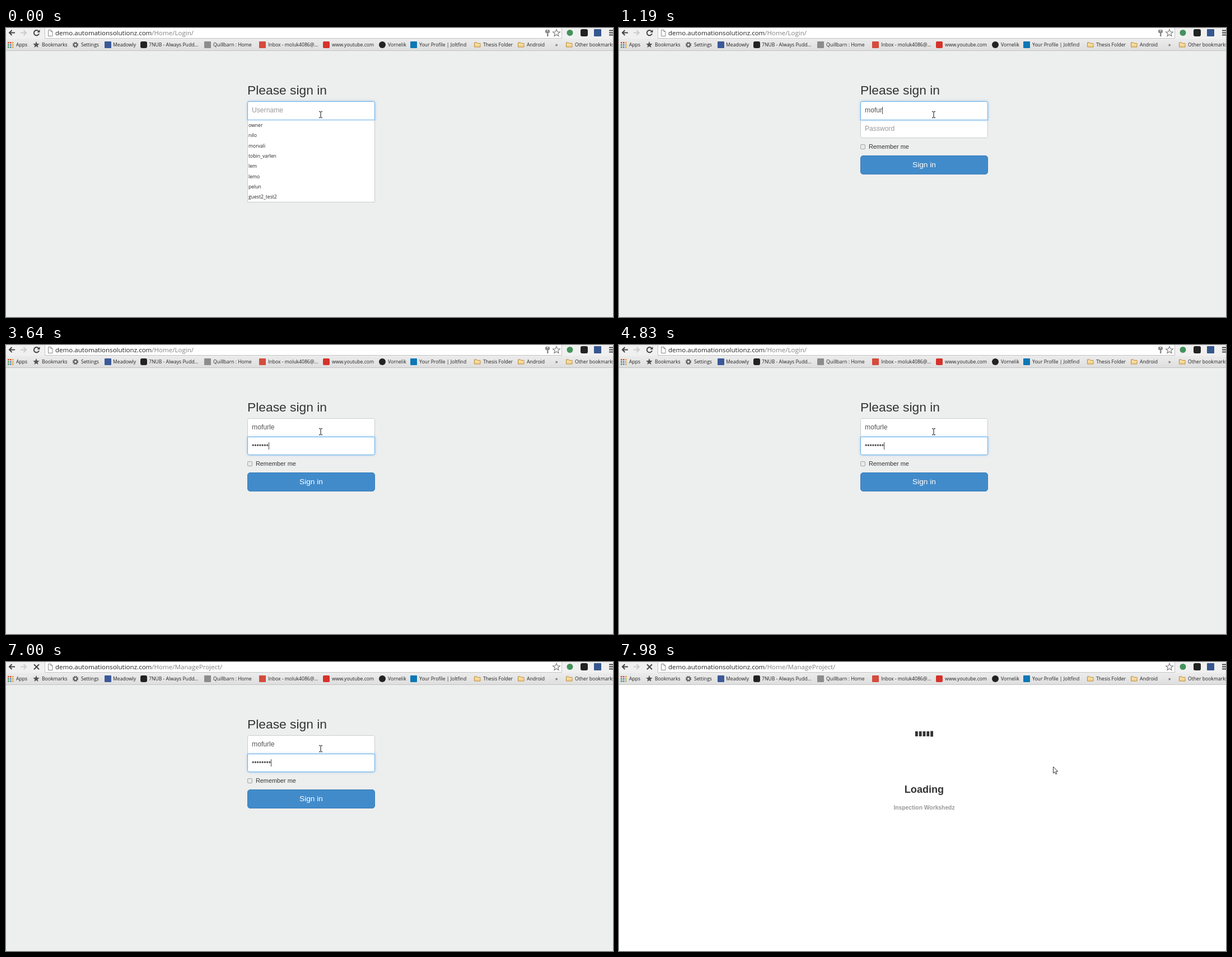
An HTML page for the animation above (8000 ms loop, 1084 px wide and 517 px high).

```html
<!DOCTYPE html>
<html lang="en">
<head>
<meta charset="utf-8">
<title>Sign in</title>
<style>
  html, body { margin: 0; width: 100%; height: 100%; overflow: hidden; background: #fff; }
  svg { display: block; }
  text { font-family: "Liberation Sans", Arial, sans-serif; font-size: 12.16px; fill: #555; white-space: pre; }
  .ui text { font-family: "Open Sans", "Noto Sans", sans-serif; font-size: 8.65px; fill: #222; }
  .ui .url { font-size: 11.55px; }
  .ui .path { fill: #808080; }
  .hint { fill: #999; }
  .mid { text-anchor: middle; }
  .line { fill: none; stroke: #444; stroke-width: 2; }
  .focus { fill: #fff; stroke: #66afe9; filter: drop-shadow(0 0 2px rgba(102,175,233,.6)); }
</style>
</head>
<body>
<svg width="1084" height="517" viewBox="0 0 1084 517">
  <defs>
    <linearGradient id="barFill" x2="0" y2="1"><stop stop-color="#ececec"/><stop offset="1" stop-color="#dedede"/></linearGradient>
    <path id="star" d="M0-6 1.6-2 5.8-1.8 2.5.9 3.6 5 0 2.7-3.6 5-2.5.9-5.8-1.8-1.6-2Z"/>
    <g id="folder" stroke="#b98a3c"><path d="M.5 9.5V1.5H4.5L6 3H11V9.5Z" fill="#f5d58e"/><path d="M1 4.5H11" stroke="#fbe9bd"/></g>
  </defs>

  <g id="login">
    <rect y="41" width="1084" height="476" fill="#edeeee"/>
    <text x="431" y="119" style="font-size:22.8px;fill:#333">Please sign in</text>
    <path d="M431.5 164V134.5q0-3 3-3H655.5q3 0 3 3V164" fill="#fff" stroke="#ccc"/>
    <path d="M431.5 164.5V193.5q0 3 3 3H655.5q3 0 3-3V164.5Z" fill="#fff" stroke="#ccc"/>
    <path id="focusUser" class="focus" d="M431.5 164.500V134.500q0-3 3-3H655.500q3 0 3 3V164.500Z"/>
    <path id="focusPass" class="focus" d="M431.5 164.500V193.500q0 3 3 3H655.500q3 0 3-3V164.500Z"/>
    <text id="user" x="439" y="151"></text>
    <text id="pass" x="439" y="184"></text>
    <rect id="caret" width="1" height="13" fill="#444"/>
    <rect x="431.5" y="208.5" width="8" height="8" rx="1.5" fill="#e9e9e9" stroke="#a4a4a4"/>
    <text x="446" y="216" style="font-size:10.85px;fill:#333">Remember me</text>
    <rect x="431.5" y="228.5" width="227" height="33" rx="4.5" fill="#428bca" stroke="#357ebd"/>
    <text x="545" y="249" class="mid" style="font-size:13.7px;fill:#fff">Sign in</text>
    <g id="menu" class="ui">
      <rect x="431" y="165" width="228" height="147" fill="#fff"/>
      <path d="M431.500 165V311.500H658.500V165" fill="none" stroke="#c6c9cb"/>
    </g>
  </g>

  <g id="loading">
    <g id="bars" fill="#333"></g>
    <text x="545" y="234" class="mid" style="font-size:18.1px;font-weight:bold;fill:#333">Loading</text>
    <text x="545" y="264" class="mid" style="font-size:10.3px;font-weight:bold;fill:#999">Inspection Workshedz</text>
  </g>

  <g id="chrome" class="ui">
    <rect width="1084" height="20" fill="#f0f0f0"/>
    <rect x="69" width="924" height="18" fill="#fff"/>
    <path d="M69.5 0V18.5H992.5V0" fill="none" stroke="#c4c4c4"/>
    <rect y="19" width="1084" height="22" fill="url(#barFill)"/>
    <path d="M0 40.5H1084" stroke="#c3c3c3"/>
    <path class="line" d="M16 8.5H6M10.5 4 6 8.5 10.5 13"/>
    <path class="line" d="M26 8.5H36M31.5 4 36 8.5 31.5 13" style="stroke:#ccc"/>
    <g id="reload"><path class="line" d="M58 5.5A4.7 4.7 0 1 0 59 10"/><path d="M60.5 3V8H55.5Z" fill="#444"/></g>
    <path id="stop" class="line" d="M50 4.3 59 13.3M59 4.3 50 13.3"/>
    <path d="M75.5 3.5H80L83 6.5V14.5H75.5ZM80 3.5V6.5H83" fill="#fff" stroke="#888"/>
    <text class="url" x="88" y="13">demo.automationsolutionz.com<tspan id="path" class="path"></tspan></text>
    <g id="key" fill="#8a8a8a"><rect x="963" y="3" width="8" height="6" rx="2"/><rect x="966" y="8" width="2.5" height="7"/><rect x="966" y="4" width="2" height="1.5" fill="#fff"/></g>
    <use href="#star" transform="translate(983 9) scale(1.1)" fill="#fff" stroke="#777"/>
    <circle cx="1007" cy="8.5" r="5.5" fill="#43925b"/>
    <rect x="1026" y="2" width="13" height="13" rx="3" fill="#222"/>
    <rect x="1050" y="2" width="13" height="13" rx="1" fill="#35568f"/>
    <path class="line" d="M1077 4.5H1084M1077 8.5H1084M1077 12.5H1084"/>
    <use href="#star" x="54" y="30" fill="#555"/>
    <circle cx="124" cy="30" r="4.2" fill="none" stroke="#555" stroke-width="1.8" stroke-dasharray="2 1.3"/>
    <circle cx="124" cy="30" r="2.8" fill="none" stroke="#555" stroke-width="1.5"/>
    <text x="981" y="33">»</text>
    <use href="#folder" x="836" y="24.5"/><use href="#folder" x="914" y="24.5"/><use href="#folder" x="1000" y="24.5"/>
  </g>

  <path id="beam" d="M559 149.5H561.5M562.5 149.5H565M562 150V160M559 160.5H561.5M562.5 160.5H565" fill="none" stroke="#444" stroke-width="1.3"/>
  <path id="arrow" d="M.5.5V12L3.2 9.5 5 13.7 6.9 12.9 5.1 8.8H8.8Z" fill="#fff" stroke="#333"/>
</svg>
<script>
const $ = id => document.getElementById(id);
const add = (id, markup) => $(id).insertAdjacentHTML('beforeend', markup);
const show = (id, on) => $(id).style.display = on ? '' : 'none';
const clamp = v => Math.max(0, Math.min(1, v));
const countPassed = (times, t) => times.filter(s => t >= s).length;

const bookmarks = [
  [18, 'Apps'], [64, 'Bookmarks'], [134, 'Settings'], [191, 'Meadowly'],
  [255, '7NUB - Always Pudd...'], [370, 'Quillbarn : Home'], [468, 'Inbox - moluk4086@...'],
  [582, 'www.youtube.com'], [682, 'Vornelik'], [738, 'Your Profile | Joltfind'],
  [852, 'Thesis Folder'], [930, 'Android'], [1016, 'Other bookmarks']
];
for (const [x, label] of bookmarks) add('chrome', `<text x="${x}" y="33">${label}</text>`);

const badges = [[176, '#3b5998', 1], [240, '#222', 3], [354, '#8c8c8c', 1], [452, '#d54b3d', 1],
  [566, '#d6322a', 2], [666, '#222', 6], [722, '#0d77b5', 1]];
for (const [x, fill, rx] of badges)
  add('chrome', `<rect x="${x}" y="24" width="12" height="12" rx="${rx}" fill="${fill}"/>`);

const dots = ['#d64a38', '#d64a38', '#e0a52c', '#3f9a58', '#4d7fc4', '#e0a52c', '#3f9a58', '#4d7fc4', '#e0a52c'];
dots.forEach((fill, i) => add('chrome',
  `<rect x="${3 + i % 3 * 4}" y="${25 + Math.floor(i / 3) * 4}" width="2.6" height="2.6" fill="${fill}"/>`));

['owner', 'nilo', 'morvali', 'tobin_varlen', 'lem', 'lemo', 'pelun', 'guest2_test2'].forEach((name, i) =>
  add('menu', `<text x="433" y="${177.2 + i * 18.29}">${name}</text>`));

for (let i = 0; i < 5; i++) add('bars', `<rect x="${529 + i * 6.8}" width="4.8"/>`);

const LOOP = 8000, STEP = 70;
const userKeys = [70, 210, 770, 980, 1190, 1400, 1540];
const passKeys = [2520, 2590, 2730, 2870, 3290, 3500, 3640, 3850];
const caretOff = [[0, 70], [630, 770], [4340, 4830], [6300, 6790]];

function setField(id, value, hint) {
  $(id).textContent = value || hint;
  $(id).setAttribute('class', value ? '' : 'hint');
  return value ? $(id).getComputedTextLength() : 0;
}

function render(t) {
  const onLogin = t < 7210;
  show('login', onLogin);
  show('menu', t < 70);
  show('loading', t >= 7420);
  show('reload', t < 6650);
  show('stop', t >= 6650);
  show('key', t < 7000);
  $('path').textContent = t < 7000 ? '/Home/Login/' : '/Home/ManageProject/';

  if (onLogin) {
    const userWidth = setField('user', 'mofurle'.slice(0, countPassed(userKeys, t)), 'Username');
    const passWidth = setField('pass', '•'.repeat(countPassed(passKeys, t)), 'Password');
    const inPass = t >= 1890;
    const fade = clamp((t - 1820) / 210);
    $('focusUser').style.opacity = 1 - fade;
    $('focusPass').style.opacity = fade;
    $('caret').setAttribute('x', Math.round(439 + (inPass ? passWidth : userWidth)));
    $('caret').setAttribute('y', inPass ? 174 : 141);
    show('caret', !caretOff.some(([from, to]) => t >= from && t < to));
  }

  [...$('bars').children].forEach((bar, i) => {
    const height = 9 + 3 * Math.sin(Math.PI * clamp((t - 7500 - i * 80) / 180));
    bar.setAttribute('y', 128.5 - height / 2);
    bar.setAttribute('height', height);
  });

  const p = clamp((t - 7350) / 560), ease = p * p * (3 - 2 * p);
  show('beam', t < 7350);
  show('arrow', t >= 7350);
  $('arrow').setAttribute('transform', `translate(${562 + 213 * ease} ${154 + 33 * ease})`);
}

const start = performance.now();
function tick() {
  const t = (performance.now() - start) % LOOP;
  render(Math.floor(t / STEP) * STEP);
  requestAnimationFrame(tick);
}
tick();
</script>
</body>
</html>
```
